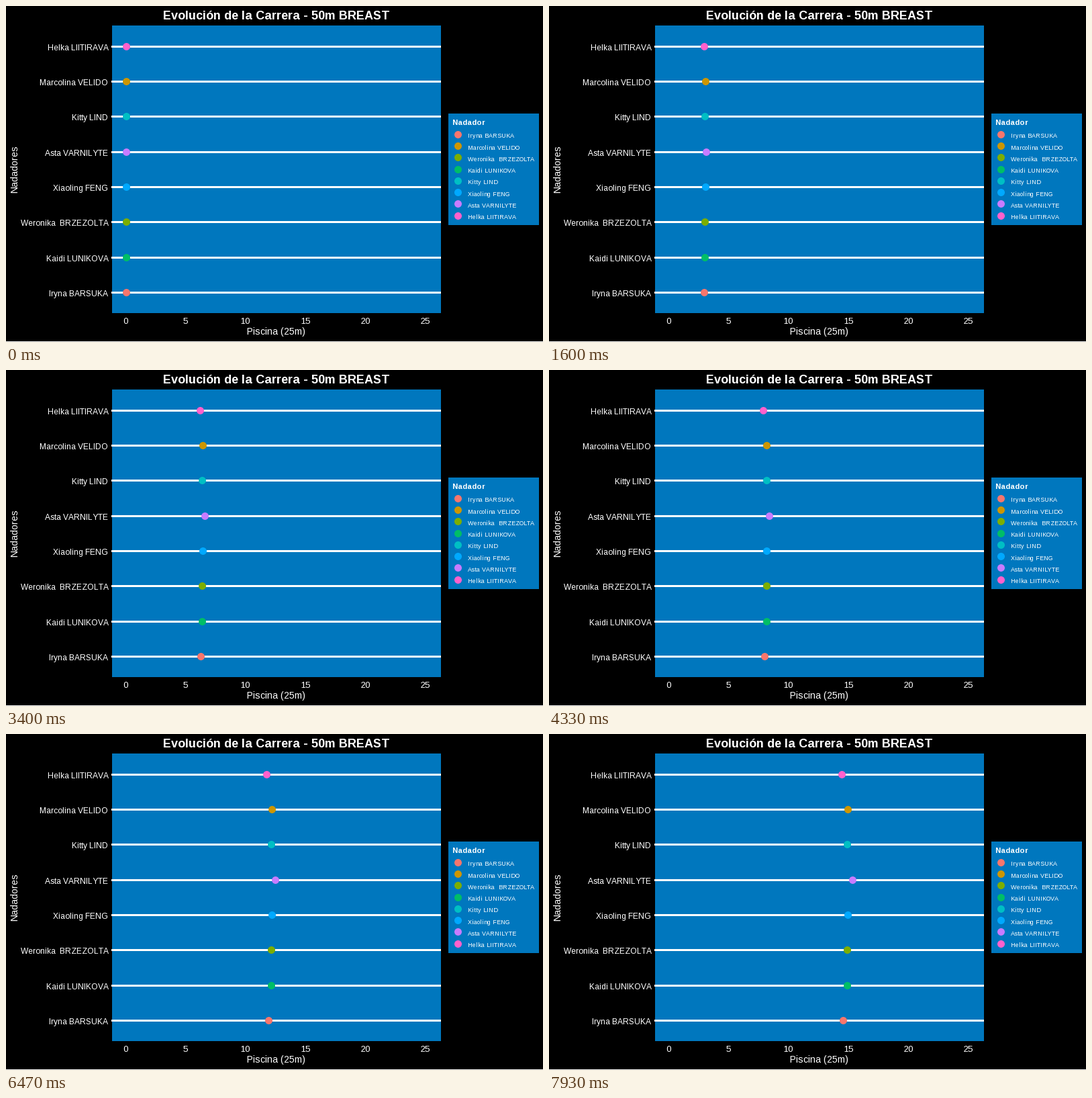
Recreate the animation shown at these times as a matplotlib script. Size 800 by 500 pixels, loop 8000 ms.

```python
import math

import matplotlib.pyplot as plt
from matplotlib.animation import FuncAnimation
from matplotlib.patches import Circle, Rectangle

plt.rcParams["font.family"] = "Liberation Sans"
plt.rcParams["text.hinting"] = "force_autohint"
plt.rcParams["text.hinting_factor"] = 1

W, H, DPI = 800, 500, 100
TICK_MS, LOOP_MS = 20, 8000
STEP_MS = 200 / 3  # the swimmers advance 15 times a second
POOL = "#0077BE"
START_X = 179.0

# name, colour, speed in pixels per step; top lane first
SWIMMERS = [
    ("Helka LIITIRAVA", "#FF61CC", 2.1595),
    ("Marcolina VELIDO", "#CD9600", 2.2355),
    ("Kitty LIND", "#00BFC4", 2.2245),
    ("Asta VARNILYTE", "#C77CFF", 2.2915),
    ("Xiaoling FENG", "#00A9FF", 2.2355),
    ("Weronika  BRZEZOLTA", "#7CAE00", 2.2245),
    ("Kaidi LUNIKOVA", "#00BE67", 2.2245),
    ("Iryna BARSUKA", "#F8766D", 2.1805),
]
LEGEND_ORDER = [7, 1, 5, 6, 2, 4, 3, 0]

fig = plt.figure(figsize=(W / DPI, H / DPI), dpi=DPI, facecolor="black")
ax = fig.add_axes([0, 0, 1, 1])
ax.set_xlim(0, W)
ax.set_ylim(H, 0)
ax.axis("off")


def snap(v):
    """Centre of the pixel nearest to v."""
    return math.floor(v + 0.5) + 0.5


def box(x0, y0, x1, y1, color):
    ax.add_patch(Rectangle((x0, y0), x1 - x0, y1 - y0, color=color, lw=0))


def label(x, y, text, px, **kw):
    kw = {"ha": "left", "va": "baseline", "color": "white", **kw}
    ax.text(x, y, text, fontsize=px * 72 / DPI, **kw)


def dot(x, y, color):
    patch = Circle((snap(x), snap(y)), 5.5, facecolor=color,
                   edgecolor="none", zorder=3)
    return ax.add_patch(patch)


# pool, lanes and swimmers
box(0, 499, W, H, "white")
box(158, 29, 648, 457, POOL)
dots = []
for i, (name, color, _) in enumerate(SWIMMERS):
    y = 59.8 + 52.29 * i
    row = snap(y)
    box(157, row - 1.5, 648, row + 1.5, "white")
    label(152.5, row + 5.5, name, 12, ha="right")
    dots.append(dot(START_X, y, color))

# titles and axis
label(402.5, 20, "Evolución de la Carrera - 50m BREAST", 18.2,
      ha="center", weight="bold")
for k in range(6):
    label(178.3 + 89.45 * k, 473, str(5 * k), 12.5, ha="center")
label(402.5, 489, "Piscina (25m)", 14, ha="center")
label(17, 242, "Nadadores", 14.3, ha="center", rotation=90,
      rotation_mode="anchor")

# legend
box(659, 160, 794, 326, POOL)
label(665, 177, "Nadador", 11, weight="bold")
for i, s in enumerate(LEGEND_ORDER):
    name, color, _ = SWIMMERS[s]
    y = 190.8 + 17.28 * i
    dot(673, y, color)
    label(688, snap(y + 0.5) + 4.5, name, 9.4)


def update(frame):
    step = int((frame + 0.7) * TICK_MS / STEP_MS)
    for patch, (_, _, speed) in zip(dots, SWIMMERS):
        patch.set_center((snap(START_X + speed * step), patch.center[1]))
    return dots


anim = FuncAnimation(fig, update, frames=LOOP_MS // TICK_MS,
                     interval=TICK_MS, repeat=True, repeat_delay=0)
plt.show()
```
